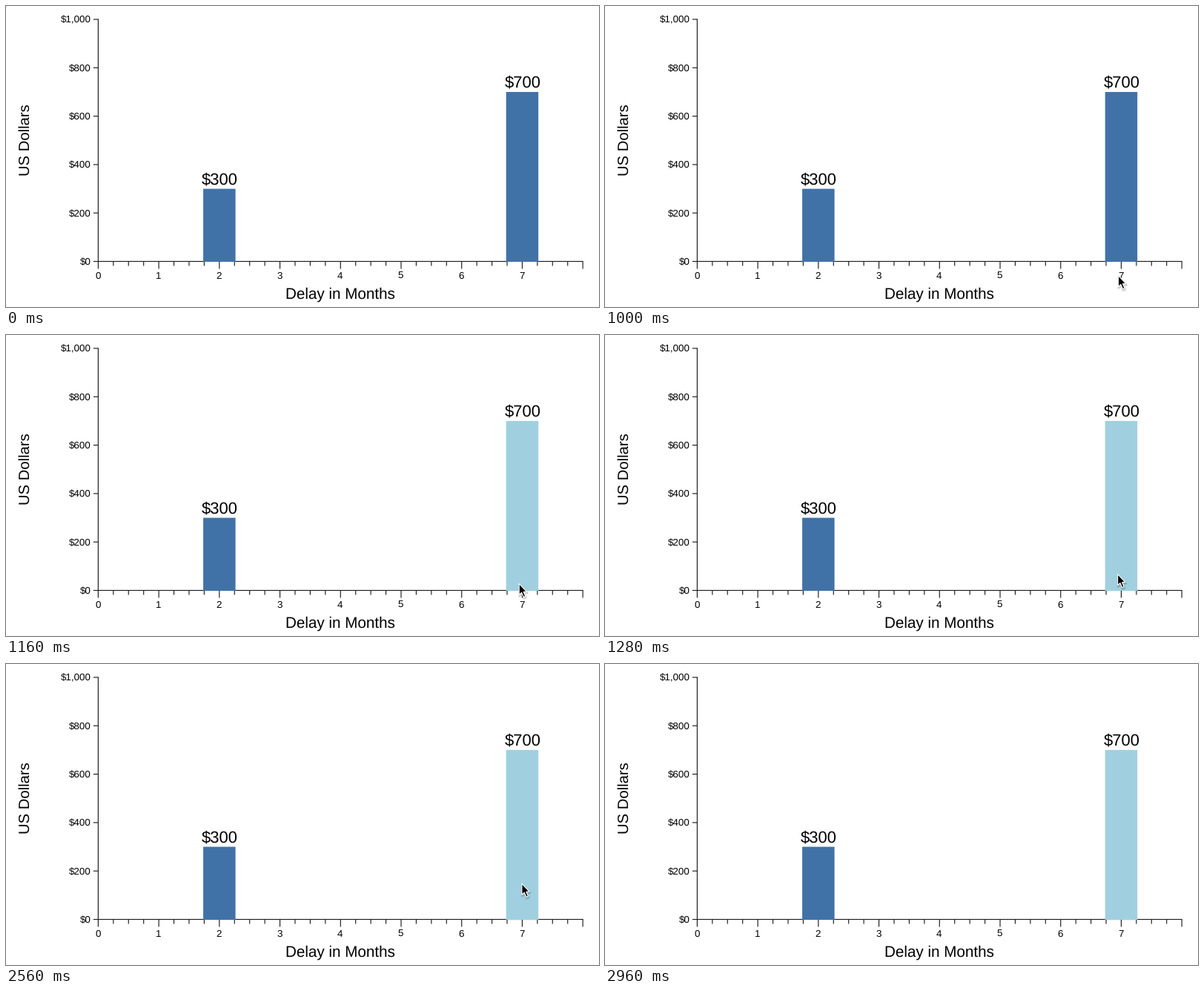
Recreate the animation shown at these times as a matplotlib script. Size 800 px wide and 406 px high, loop 4700 ms.

```python
import numpy as np
import matplotlib.pyplot as plt
from matplotlib.animation import FuncAnimation
from matplotlib.patches import Polygon, Rectangle

W, H, DPI = 800, 406, 64
STEP, LOOP = 20, 4700
PT = 72 / DPI  # points per pixel

X0, Y0 = 124.4, 344.5
UNIT_X, UNIT_Y = 81.72, 0.3265
BAR_W = 43.5
BLUE, LIGHT = "#4072a8", "#a0d0e0"
INK = "#1c1c1c"
HOVER_AT = 1160

plt.rcParams["font.family"] = "Liberation Sans"
plt.rcParams["text.hinting"] = "none"
fig = plt.figure(figsize=(W / DPI, H / DPI), dpi=DPI, facecolor="white")
ax = fig.add_axes([0, 0, 1, 1])
ax.set(xlim=(0, W), ylim=(H, 0))
ax.axis("off")


def line(x1, y1, x2, y2):
    ax.plot([x1, x2], [y1, y2], color=INK, lw=1.15 * PT, snap=False,
            solid_capstyle="butt", zorder=1)


def label(x, y, text, size, **kw):
    kw.setdefault("ha", "center")
    ax.text(x, y, text, fontsize=size * PT, color="black", va="baseline",
            rotation_mode="anchor", zorder=3, **kw)


def bar(month, dollars):
    x, top = X0 + month * UNIT_X, Y0 - dollars * UNIT_Y
    rect = Rectangle((x - BAR_W / 2, top), BAR_W, Y0 + 0.5 - top,
                     fc=BLUE, lw=0, snap=False, zorder=2)
    ax.add_patch(rect)
    label(x + 0.3, top - 6.3, f"${dollars}", 22)
    return rect


# Axes with ticks
line(X0, 17.5, X0, Y0)
line(X0 - 0.5, Y0, X0 + 8 * UNIT_X + 0.5, Y0)
for dollars in range(0, 1001, 200):
    y = Y0 - dollars * UNIT_Y
    line(X0 - 6.5, y, X0, y)
    label(114.3, y + 4.4, f"${dollars:,}", 13.4, ha="right")
for quarter in range(33):
    x = X0 + quarter * UNIT_X / 4
    line(x, Y0, x, Y0 + (10 if quarter % 4 == 0 else 6))
for month in range(8):
    label(X0 + month * UNIT_X - 0.4, 368.3, str(month), 13.4)

label(451, 394.5, "Delay in Months", 20.6)
label(32, 181, "US Dollars", 20.2, rotation=90)
ax.add_patch(Rectangle((0, 404.5), W, 2, fc="#f8f8f8", lw=0, zorder=0))

bar(2, 300)
late_bar = bar(7, 700)

# Mouse pointer: soft shadow layers below an outlined arrow
ARROW = np.array([(0, 0), (0, 15.2), (3.4, 12), (6, 18.2),
                  (8.6, 17.1), (6, 11), (10.4, 11)])
SHADOW_SHIFT = np.array([0.6, 1.6])


def arrow(**kw):
    return ax.add_patch(Polygon(ARROW, closed=True, **kw))


shadows = [arrow(fc="none", ec=(0, 0, 0, 0.1), lw=w * PT, zorder=4,
                 joinstyle="round") for w in (2, 3.5)]
pointer = arrow(fc="black", ec="white", lw=1.2 * PT, zorder=5,
                joinstyle="miter")

# Waypoints of the pointer tip: quick entry that slows down over the bar
ENTER_T = [820, 960, 1140, 1280, 1340, 1500]
ENTER_X = [692.5, 692.5, 692.3, 691.6, 691.5, 696]
ENTER_Y = [402.8, 371, 337.5, 322.5, 315.5, 297.5]
EXIT_START, EXIT_END = 2540, 2960


def tip_at(t):
    x, y = np.interp(t, ENTER_T, ENTER_X), np.interp(t, ENTER_T, ENTER_Y)
    u = np.clip((t - EXIT_START) / (EXIT_END - EXIT_START), 0, 1) ** 1.8
    return np.array([x - 30 * u, y - 320 * u])


def draw(i):
    t = i * STEP
    tip = tip_at(t)
    shown = ENTER_T[0] <= t < EXIT_END
    pointer.set_xy(ARROW + tip)
    for s in shadows:
        s.set_xy(ARROW + tip + SHADOW_SHIFT)
    for p in (pointer, *shadows):
        p.set_visible(shown)
    late_bar.set_facecolor(LIGHT if t >= HOVER_AT else BLUE)
    return [late_bar, *shadows, pointer]


anim = FuncAnimation(fig, draw, frames=LOOP // STEP, interval=STEP,
                     init_func=lambda: draw(0), repeat=True, repeat_delay=0)
plt.show()
```
